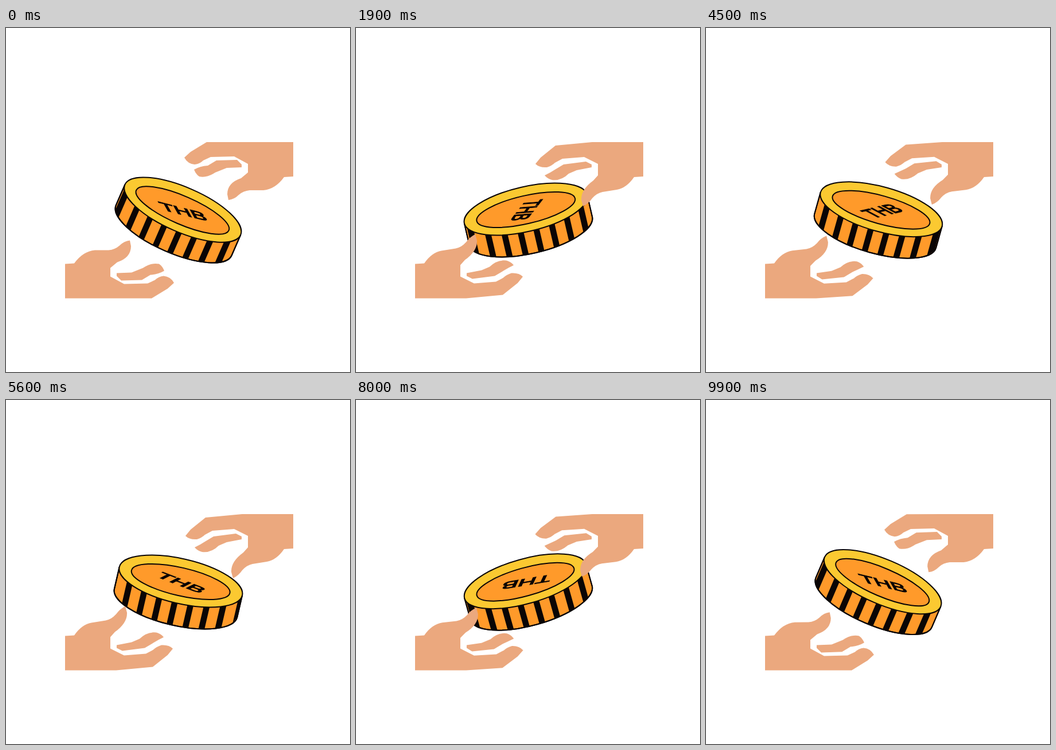
Animation, 600 px wide and 600 px high, one loop 10 s. Source, as an HTML page:

```html
<!DOCTYPE html>
<html lang="en">
<head>
<meta charset="utf-8">
<title>Coin between hands</title>
<style>
  html, body { margin: 0; width: 100%; height: 100%; overflow: hidden; background: #fff; }
  svg { display: block; width: 100vw; height: 100vh; }
  .line { stroke: #0a0505; stroke-width: 2; stroke-linejoin: round; }
  text { font: 45px "Liberation Sans", Arial, sans-serif; text-anchor: middle; fill: #0a0505; stroke: #0a0505; stroke-width: 2.6; }
</style>
</head>
<body>
<svg viewBox="0 0 600 600">
  <g id="coin">
    <path id="side" class="line" fill="#ff9a2a"/>
    <path id="stripes" fill="#0a0505"/>
    <path id="rim" class="line" fill="none"/>
    <ellipse id="face" class="line" fill="#fbc931"/>
    <ellipse id="inset" class="line" fill="#ff9a2a"/>
    <text id="label" y="16.5">THB</text>
  </g>
  <g fill="#eba87e">
    <path id="upper"/>
    <path id="lower" transform="rotate(180 302 335.3)"/>
  </g>
</svg>
<script>
const LOOP = 10000, STEP = 100, TAU = Math.PI * 2;
const RX = 110, RY = 39, DEPTH = 39;
const TURN = 4950, STRIPES_PER_TURN = 26, PITCH = 28, STRIPE = 10.5;
const el = id => document.getElementById(id);
const set = (id, attrs) => {
  for (const name in attrs) el(id).setAttribute(name, attrs[name]);
};

// Hand outline, open and closing; both share one command structure.
const OPEN =
  "M501 199L412 199L350 199L322 216L311 226Q317 237 329 238Q338 237 344 231L357 225L398 224L422 237L422 252" +
  "L410 262Q386 270 386 290L388 300Q398 299 406 291Q414 284 425 283L449 283Q470 281 485 260L501 259Z" +
  "M328 247Q338 241 352 240L367 231L403 230L411 238L411 243L385 244L365 252Q350 262 337 259Q331 255 328 247Z";
const CLOSING =
  "M501 199L412 199L348 205L322 226L313 237Q320 244 333 243Q342 240 347 235L360 228L398 225L422 237L422 257" +
  "L414 266Q392 282 393 300L396 311Q406 306 412 297Q420 288 430 286L455 282Q472 279 485 260L501 259Z" +
  "M329 257Q338 253 347 247L362 238L401 233L411 238L411 243L385 248L371 254Q358 267 342 265Q334 263 329 257Z";
const closingNumbers = CLOSING.match(/\d+/g).map(Number);

function handPath(grip) {
  let i = 0;
  return OPEN.replace(/\d+/g, n => (+n + (closingNumbers[i++] - n) * grip).toFixed(2));
}

// Evenly spaced bars on the coin's side, scrolling left.
function stripePath(time) {
  const shift = 9.5 - PITCH * STRIPES_PER_TURN * time / TURN;
  const clamp = x => Math.max(-RX, Math.min(RX, x));
  const edge = x => RY * Math.sqrt(1 - (x / RX) ** 2) - DEPTH / 2;
  const first = Math.floor((-RX - shift) / PITCH);
  let d = "";
  for (let x = shift + first * PITCH; x < RX + STRIPE; x += PITCH) {
    const a = clamp(x - STRIPE / 2), b = clamp(x + STRIPE / 2);
    if (a < b) d += `M${a} ${edge(a)}L${b} ${edge(b)}v${DEPTH}L${a} ${edge(a) + DEPTH}Z`;
  }
  return d;
}

const sidePath = `M${-RX} ${-DEPTH / 2}v${DEPTH}A${RX} ${RY} 0 0 0 ${RX} ${DEPTH / 2}v${-DEPTH}`;
set("side", { d: sidePath + "Z" });
set("rim", { d: sidePath });
set("face", { cy: -DEPTH / 2, rx: RX, ry: RY });
set("inset", { cy: -18.5, rx: 88, ry: 24.5 });

function draw(time) {
  const t = Math.floor((time % LOOP) / STEP) * STEP;
  const rock = TAU * t / 5000;
  const tilt = 20.5 * Math.cos(rock) + 3 * Math.cos(3 * rock);
  const spin = -25 + 360 * t / TURN;
  const hand = handPath((1 - Math.cos(TAU * t / 2500)) / 0.94);
  set("coin", { transform: `translate(300.5 335) rotate(${tilt})` });
  set("stripes", { d: stripePath(t) });
  set("label", { transform: `translate(1.5 -17.5) scale(1 .35) rotate(${spin})` });
  set("upper", { d: hand });
  set("lower", { d: hand });
}

const start = performance.now();
function tick() {
  draw(performance.now() - start);
  requestAnimationFrame(tick);
}
tick();
</script>
</body>
</html>
```
